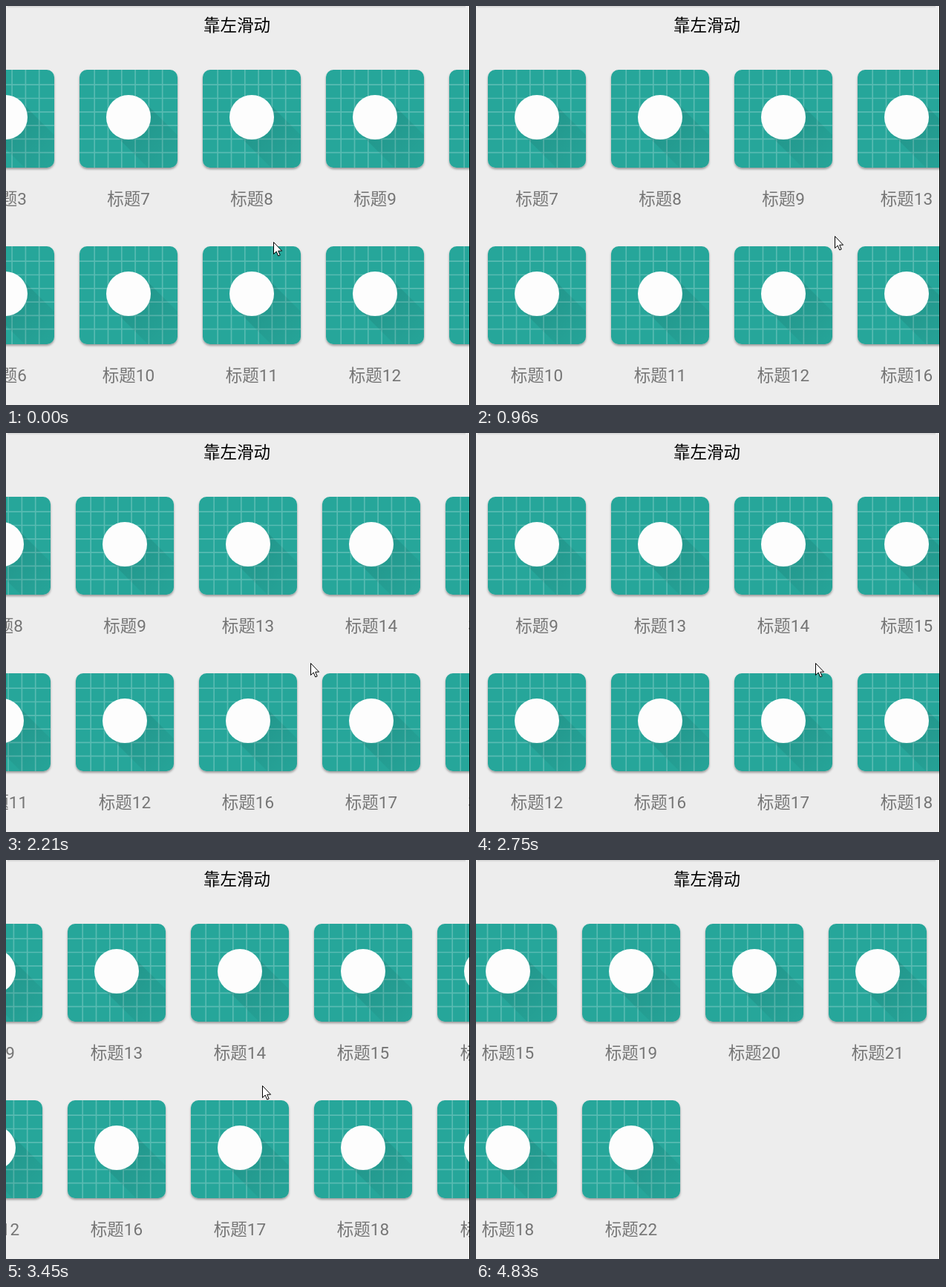
These frames come from a looping animation (625 px wide and 538 px high, 5710 ms). An HTML page:

```html
<!DOCTYPE html>
<html lang="zh-CN">
<head>
<meta charset="utf-8">
<style>
  html, body { margin: 0; width: 100%; height: 100%; overflow: hidden; background: #ededed; }
  svg { display: block; }
  text { font: 22.5px Roboto, "Noto Sans CJK SC", "Noto Sans CJK", sans-serif; text-anchor: middle; fill: #757575; }
  .heading { fill: #000; }
</style>
</head>
<body>
<svg width="625" height="538" viewBox="0 0 625 538">
  <defs>
    <linearGradient id="edge" x2="0" y2="1">
      <stop stop-color="#d2d2d2"/><stop offset="1" stop-color="#ededed"/>
    </linearGradient>
    <linearGradient id="shade" gradientUnits="userSpaceOnUse" x1="66" y1="64" x2="126" y2="124">
      <stop stop-opacity=".1"/><stop offset="1" stop-opacity=".02"/>
    </linearGradient>
    <filter id="drop" x="-10%" y="-10%" width="120%" height="125%">
      <feDropShadow dx="0" dy="2" stdDeviation="1.4" flood-opacity=".36"/>
    </filter>
    <g id="tile">
      <rect width="132" height="132" rx="10" fill="#26a69a" filter="url(#drop)"/>
      <path id="grid" fill="none" stroke="#fff" stroke-opacity=".23" stroke-width="1.7"/>
      <path d="M45 85L92 132H122Q132 132 132 122V88L87 43Z" fill="url(#shade)"/>
      <circle cx="66" cy="64" r="30" fill="#fdfdfd"/>
    </g>
  </defs>
  <rect width="625" height="538" fill="#ededed"/>
  <rect x="2" width="617" height="3" fill="url(#edge)"/>
  <text class="heading" x="311" y="33.5">靠左滑动</text>
  <g id="list"></g>
  <rect x="624" width="1" height="538" fill="#000"/>
  <path id="cursor" d="M.5.5V16.5L4.2 13 6.8 19 9.2 18 6.7 12.2H11.6Z" fill="#fff" stroke="#000"/>
</svg>
<script>
const LOOP = 5710, PITCH = 166, COLUMNS = 12, LAST_ITEM = 22;
const list = document.getElementById('list');
const cursor = document.getElementById('cursor');

// time, scroll offset, pointer x, pointer y (no pointer: hidden)
const steps = [
  [0, 415, 360, 318], [150, 424, 360, 318], [420, 428, 360, 318],
  [540, 474, 360, 318], [660, 498, 360, 318], [820, 498, 440, 310],
  [960, 498, 483, 310], [1110, 560, 413, 306], [1230, 635, 340, 302],
  [1380, 664, 318, 300], [1810, 664, 365, 303], [1930, 664, 450, 308],
  [2050, 664, 506, 311], [2210, 752, 410, 310], [2350, 830, 358, 309],
  [2600, 830, 383, 308], [2750, 830, 457, 310], [3030, 833, 443, 309],
  [3180, 862, 412, 307], [3330, 902, 372, 305], [3450, 929, 345, 304],
  [3600, 958, 318, 303], [3750, 982, 318, 303], [3870, 993, 360, 302],
  [3990, 996, 430, 301], [4110, 996, 481, 300], [4260, 1189, 275, 308],
  [4410, 1367, 67, 317], [4560, 1367, 128, 319], [4680, 1367, 178, 321],
  [4830, 1367]
];

function add(tag, attrs, text = '') {
  const node = document.createElementNS('http://www.w3.org/2000/svg', tag);
  for (const key in attrs) node.setAttribute(key, attrs[key]);
  node.textContent = text;
  list.append(node);
}

function addItem(number, x, y) {
  if (number > LAST_ITEM) return;
  add('use', { href: '#tile', x, y });
  add('text', { x: x + 66, y: y + 182 }, '标题' + number);
}

let grid = '';
for (let i = 0; i < 6; i++) {
  const p = 20.2 + i * 18.3;
  grid += `M${p} 0V132M0 ${p}H132`;
}
document.getElementById('grid').setAttribute('d', grid);

// Items fill pages of two rows with three columns each.
for (let c = 0; c < COLUMNS; c++) {
  const top = Math.floor(c / 3) * 6 + c % 3 + 1;
  addItem(top, 16 + c * PITCH, 86);
  addItem(top + 3, 16 + c * PITCH, 324);
}

function render(time) {
  const [, scroll, x, y] = steps.findLast(step => step[0] <= time);
  list.setAttribute('transform', `translate(${-scroll})`);
  cursor.style.display = x === undefined ? 'none' : '';
  if (x !== undefined) cursor.setAttribute('transform', `translate(${x} ${y})`);
}

const start = performance.now();
function tick() {
  render((performance.now() - start) % LOOP);
  requestAnimationFrame(tick);
}
tick();
</script>
</body>
</html>
```
